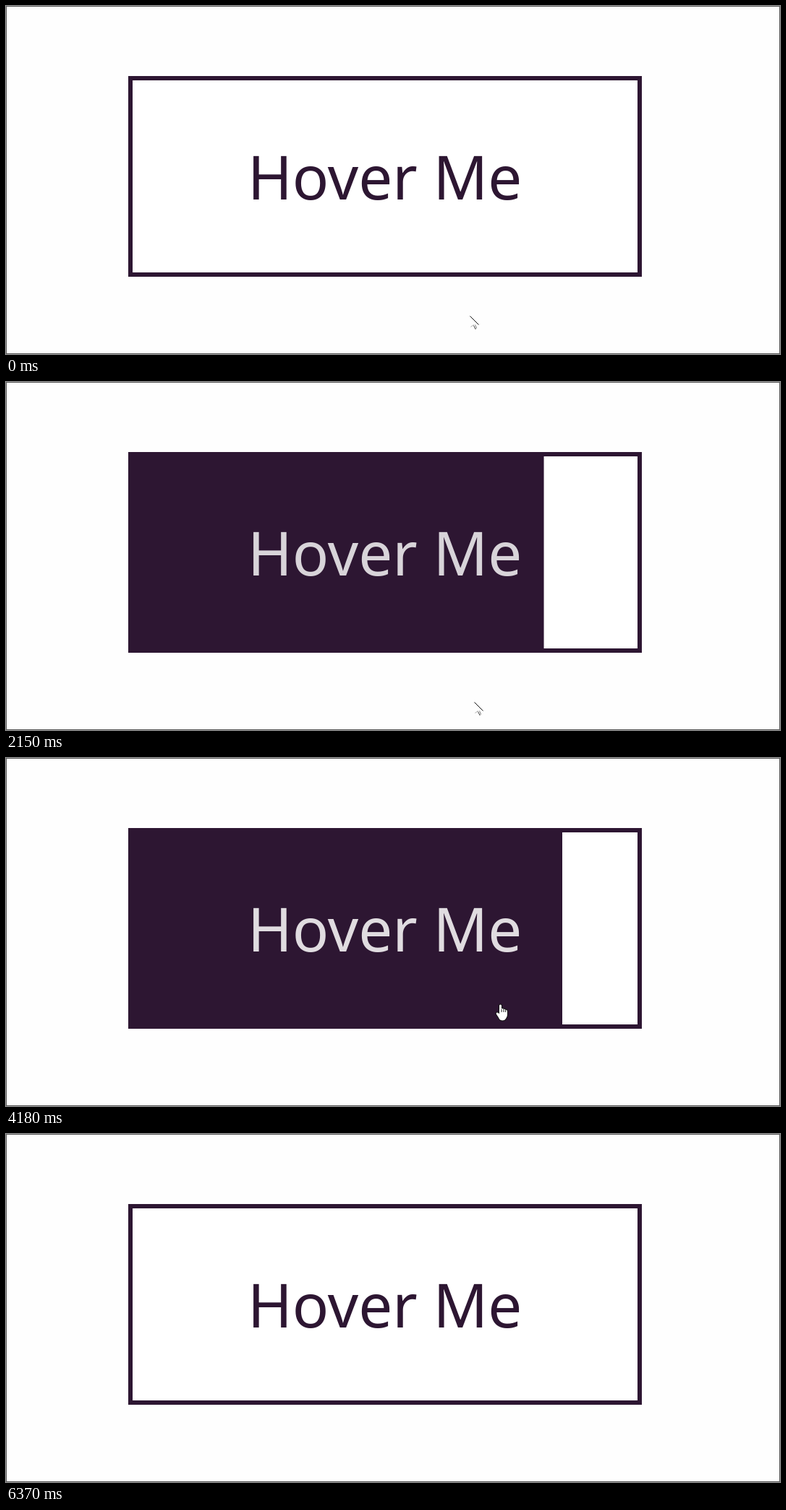
These frames come from a looping animation (1070 by 482 pixels, 6770 ms). An HTML page with a canvas:

```html
<!DOCTYPE html>
<html lang="en">
<head>
<meta charset="utf-8">
<title>Hover button</title>
<style>
  html, body { margin: 0; width: 100%; height: 100%; overflow: hidden; background: #fefefe; }
  canvas { display: block; }
</style>
</head>
<body>
<canvas id="stage" width="1070" height="482"></canvas>
<script>
const ctx = document.getElementById("stage").getContext("2d");
const LOOP = 6770;
const DARK = [45, 22, 50];
const BOX = { x: 169, y: 97, w: 710, h: 278, border: 6 };

// The screen refreshes in steps, counted anew from the start of each movement.
const STEP = 140;
const MOVES = [120, 1730, 3470, 5110];

const TRANSITION = 1000;
const HOVERS = [
  { enter: 160, leave: 2000 },
  { enter: 3616, leave: 5327 }
];

// Pointer key points; equal neighbours are rests.
const PATH = [
  { t: 0, x: 641, y: 429 },
  { t: 60, x: 641, y: 429 },
  { t: 690, x: 712, y: 243 },
  { t: 1730, x: 712, y: 243 },
  { t: 2150, x: 647, y: 443 },
  { t: 2420, x: 637, y: 465 },
  { t: 3400, x: 637, y: 465 },
  { t: 3750, x: 683, y: 341 },
  { t: 4900, x: 683, y: 341 },
  { t: 5110, x: 688, y: 349 },
  { t: 5830, x: 964, y: 464 }
];
const POINTER_GONE = 5940;

const mix = (a, b, k) => a + (b - a) * k;
const rgb = c => `rgb(${c.map(Math.round).join(",")})`;

function snap(t) {
  const start = MOVES.filter(m => m <= t).pop();
  return start === undefined ? 0 : t - (t - start) % STEP;
}

// The CSS "ease" curve, cubic-bezier(.25, .1, .25, 1).
function ease(p) {
  if (p <= 0) return 0;
  if (p >= 1) return 1;
  let lo = 0, hi = 1;
  for (let i = 0; i < 24; i++) {
    const s = (lo + hi) / 2;
    if (0.75 * s * (1 - s) + s ** 3 < p) lo = s; else hi = s;
  }
  const s = lo, r = 1 - s;
  return 0.3 * s * r * r + 3 * s * s * r + s ** 3;
}

function hoverAmount(t) {
  return HOVERS.reduce((sum, { enter, leave }) =>
    sum + ease((t - enter) / TRANSITION) - ease((t - leave) / TRANSITION), 0);
}

function pointerAt(t) {
  const i = PATH.findIndex(p => p.t > t);
  if (i < 0) return PATH[PATH.length - 1];
  const a = PATH[i - 1], b = PATH[i];
  const k = (t - a.t) / (b.t - a.t);
  return { x: Math.round(mix(a.x, b.x, k)), y: Math.round(mix(a.y, b.y, k)) };
}

function line(color, x0, y0, x1, y1) {
  ctx.lineWidth = 1;
  ctx.strokeStyle = color;
  ctx.beginPath();
  ctx.moveTo(x0, y0);
  ctx.lineTo(x1, y1);
  ctx.stroke();
}

function drawArrow() {
  line("#111", 0, 0, 12, 12);
  line("#aaa", 1, 15, 5, 12);
  line("#444", 5, 13, 7.5, 18);
  line("#777", 7, 12, 9, 16.5);
  line("#888", 7, 18, 9, 17);
}

const hand = new Path2D(
  "M-1.5 11V1.5Q-1.5 0 0 0T1.5 1.5V6Q3 5 4.5 6.5Q6 5.5 7.2 7.2Q9.5 7 9.5 9.5" +
  "V14Q9.5 17 7.5 19.5Q6 22 3 22Q-1 22-2 19Q-3 17-5.5 13.5Q-6.5 11.5-4.8 11Q-3 10.8-1.5 13Z");

function drawHand() {
  ctx.lineWidth = 1.8;
  ctx.strokeStyle = "#111";
  ctx.stroke(hand);
  ctx.fillStyle = "#fff";
  ctx.fill(hand);
  for (const x of [1.5, 4.5, 7.2]) line("#222", x, 6.5, x, 10.5);
}

function drawPointer(t) {
  if (t >= POINTER_GONE) return;
  const { x, y } = pointerAt(t);
  const over = HOVERS.some(h => t >= h.enter && t < h.leave);
  ctx.save();
  ctx.translate(x + 0.5, y + 0.5);
  (over ? drawHand : drawArrow)();
  ctx.restore();
}

function draw(t) {
  const k = hoverAmount(t);
  const { x, y, w, h, border: b } = BOX;

  ctx.fillStyle = "#fefefe";
  ctx.fillRect(0, 0, 1070, 482);

  ctx.fillStyle = rgb(DARK);
  ctx.fillRect(x, y, w, h);
  const inner = w - 2 * b;
  ctx.fillStyle = "#fff";
  ctx.fillRect(x + b + inner * k, y + b, inner * (1 - k), h - 2 * b);

  ctx.font = '400 83.5px "Noto Sans", "Open Sans", sans-serif';
  ctx.fillStyle = rgb(DARK.map(c => mix(c, 255, k)));
  ctx.fillText("Hover Me", 334, 268);

  drawPointer(t);

  ctx.lineWidth = 1;
  ctx.strokeStyle = "#5c5c5c";
  ctx.strokeRect(0.5, 0.5, 1069, 481);
}

const start = performance.now();
function frame() {
  draw(snap(Math.max(0, performance.now() - start) % LOOP));
  requestAnimationFrame(frame);
}
frame();
</script>
</body>
</html>
```
